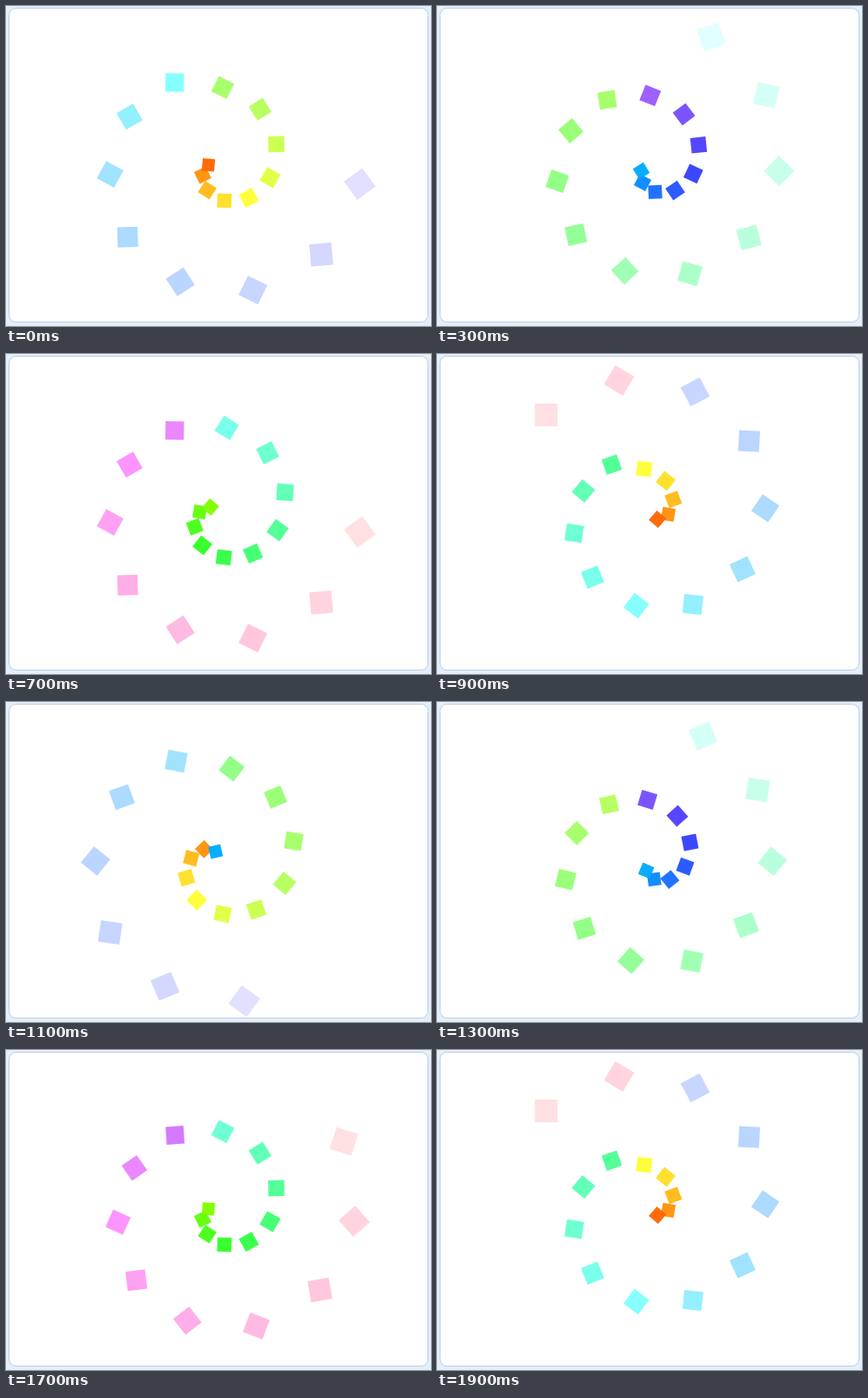
Write an HTML page with a canvas that moves like this. It is 488x368 px and loops after 2000 ms.

```html
<!DOCTYPE html>
<html lang="en">
<head>
<meta charset="utf-8">
<title>Spiral of squares</title>
<style>
  html, body { margin: 0; width: 100%; height: 100%; overflow: hidden; background: #e4effc; }
  canvas { display: block; }
</style>
</head>
<body>
<canvas id="stage" width="488" height="368"></canvas>
<script>
const ctx = document.getElementById("stage").getContext("2d");
const CENTER = { x: 244, y: 183 };
const LIFE = 18;               // steps a square stays visible
const CYCLE = 31;              // one empty step, then three rounds of ten squares
const ROUND_HUES = [24, 200, 90];
const rad = degrees => degrees * Math.PI / 180;

function drawPanel() {
  ctx.fillStyle = "#e4effc";
  ctx.fillRect(0, 0, 488, 368);
  ctx.beginPath();
  ctx.roundRect(3.5, 2.5, 481, 361, 8);
  ctx.fillStyle = "#fff";
  ctx.fill();
  ctx.strokeStyle = "#bccbe0";
  ctx.stroke();
}

// Each square turns 5 degrees per step, so its path is a circular arc.
function drawSquare(round, index, age) {
  const radius = 230 * Math.sin(rad(2.5 * (age + 1.15)));
  const angle = rad(-106.9 + 36 * index + 2.5 * age);
  const size = 14.2 + 0.7 * age;
  ctx.save();
  ctx.translate(CENTER.x + radius * Math.cos(angle), CENTER.y + radius * Math.sin(angle));
  ctx.rotate(rad(-13 + 36 * index + 5 * age));
  ctx.globalAlpha = 0.97 - 0.05 * age;
  ctx.fillStyle = `hsl(${ROUND_HUES[round] + 9 * age}, 100%, 50%)`;
  ctx.fillRect(-size / 2, -size / 2, size, size);
  ctx.restore();
}

function draw(time) {
  const tick = Math.floor(time / 100) % 20;
  const step = 9 + 3 * tick + (tick >= 18 ? 1 : 0);
  drawPanel();
  for (let age = LIFE - 1; age >= 0; age--) {
    const slot = (step - age + CYCLE) % CYCLE;
    if (slot > 0) drawSquare(Math.floor((slot - 1) / 10), (slot - 1) % 10, age);
  }
}

function loop() {
  draw(performance.now());
  requestAnimationFrame(loop);
}
loop();
</script>
</body>
</html>
```
